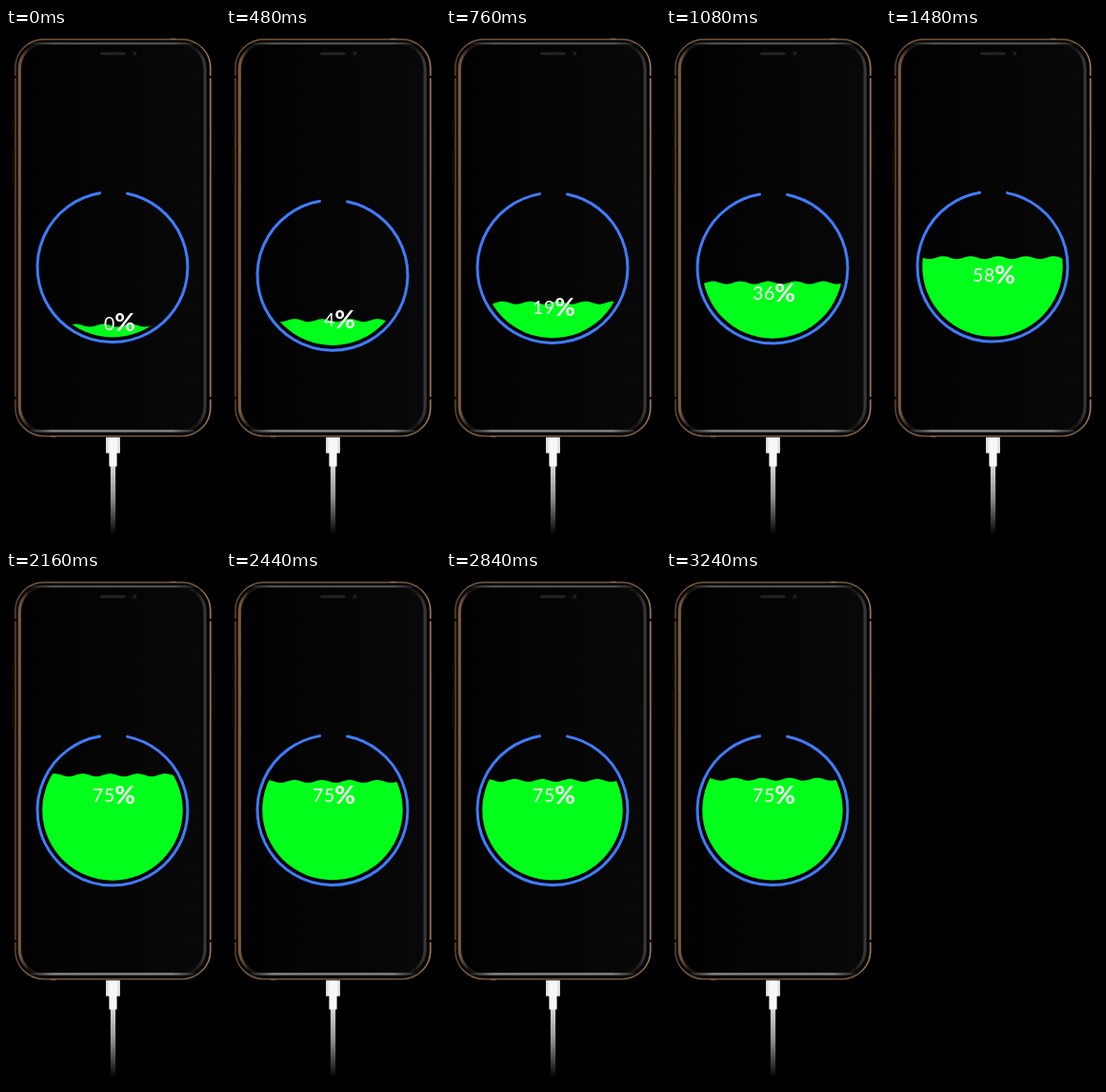
An HTML page that plays this animation: 225x542 px, repeating every 3.28 s.

```html
<!DOCTYPE html>
<html lang="en">
<head>
<meta charset="utf-8">
<title>Charging</title>
<style>
html, body { margin: 0; width: 100%; height: 100%; overflow: hidden; background: #000; }
svg { display: block; width: 225px; height: 542px; }
text { fill: #fff; font-family: Lato, "Open Sans", sans-serif; }
</style>
</head>
<body>
<svg viewBox="0 0 225 542">
  <defs>
    <linearGradient id="gold">
      <stop offset="0" stop-color="#5e4430"/>
      <stop offset=".06" stop-color="#75583f"/>
      <stop offset=".94" stop-color="#75583f"/>
      <stop offset="1" stop-color="#a88263"/>
    </linearGradient>
    <linearGradient id="side">
      <stop offset="0" stop-color="#7c5a40"/>
      <stop offset=".05" stop-color="#1a1512"/>
      <stop offset=".2" stop-color="#0c0c0c"/>
      <stop offset=".8" stop-color="#0c0c0c"/>
      <stop offset=".95" stop-color="#161616"/>
      <stop offset="1" stop-color="#383838"/>
    </linearGradient>
    <linearGradient id="edge">
      <stop offset="0" stop-color="#808080" stop-opacity="0"/>
      <stop offset=".15" stop-color="#808080"/>
      <stop offset=".85" stop-color="#808080"/>
      <stop offset="1" stop-color="#808080" stop-opacity="0"/>
    </linearGradient>
    <linearGradient id="glass">
      <stop offset="0" stop-color="#010101"/>
      <stop offset="1" stop-color="#080808"/>
    </linearGradient>
    <linearGradient id="plug">
      <stop offset="0" stop-color="#d4d4d4"/>
      <stop offset=".3" stop-color="#f8f8f8"/>
      <stop offset=".75" stop-color="#f8f8f8"/>
      <stop offset="1" stop-color="#d0d0d0"/>
    </linearGradient>
    <linearGradient id="cord" x2="0" y2="1">
      <stop offset="0" stop-color="#d6d6d6"/>
      <stop offset=".45" stop-color="#929292"/>
      <stop offset="1" stop-color="#000"/>
    </linearGradient>
    <clipPath id="bowl"><circle cx="112" cy="251.6" r="73.8"/></clipPath>
  </defs>

  <g fill="none">
    <path d="M7.5 95V113M7.5 126V166M217 106V155" stroke="#1a130e"/>
    <rect x="9.8" y="12" width="205.2" height="417.4" rx="30" fill="#040302" stroke="url(#gold)" stroke-width="1.5"/>
    <rect x="14.3" y="16" width="194.9" height="409" rx="27" fill="url(#glass)" stroke="url(#side)" stroke-width="3.2"/>
    <rect x="11.6" y="42" width="1" height="357" fill="#2d2018"/>
    <rect x="22" y="15.3" width="180" height="2" fill="url(#edge)" opacity=".65"/>
    <rect x="22" y="422.8" width="180" height="2.6" fill="url(#edge)"/>
    <path d="M9 51.5H12M213 51.5H216M9 389.5H12M213 389.5H216" stroke="#080605" stroke-width="2.5"/>
    <path d="M173 11.3H179M47 430H53" stroke="#8a6a50"/>
    <path d="M100.5 27H124" stroke="#242424" stroke-width="3" stroke-linecap="round"/>
    <circle cx="135" cy="27" r="2.7" fill="#111319"/>
    <circle cx="136" cy="26.7" r=".9" fill="#303548"/>
  </g>
  <rect x="109.9" y="461" width="5.2" height="72" fill="url(#cord)"/>
  <path d="M105 430.7H120V447.5H116.6V461.5H108.4V447.5H105Z" fill="url(#plug)"/>

  <g id="dial">
    <path id="ring" fill="none" stroke="#407cff" stroke-width="3" stroke-linecap="round"/>
    <g clip-path="url(#bowl)"><path id="liquid" fill="#02ff1c"/></g>
  </g>
  <g id="label">
    <text id="count" x="114.8" y="7.8" font-size="19.5" letter-spacing=".6" text-anchor="end"></text>
    <text x="114.2" y="9.4" font-size="26.5" font-weight="700">%</text>
  </g>
</svg>
<script>
const LOOP = 3280, CX = 112, CY = 251.6, R = 79;
const get = id => document.getElementById(id);
const [dial, ring, liquid, label, count] = ["dial", "ring", "liquid", "label", "count"].map(get);

// Piecewise linear steps: [time, value]
const DROP = [[0, 0], [560, 10], [780, 0]];
const LEVEL = [[400, 313], [2000, 207.4], [2260, 219.3]];
const LABEL = [[400, 310], [2000, 235.5]];
const PERCENT = [[400, 0], [1800, 75]];
const DRIFT = [[0, 15.5], [1080, 78], [1480, 118], [3280, 249]];

function at(steps, t) {
  if (t <= steps[0][0]) return steps[0][1];
  for (let i = 1; i < steps.length; i++) {
    const [a, from] = steps[i - 1], [b, to] = steps[i];
    if (t < b) return from + (to - from) * (t - a) / (b - a);
  }
  return steps[steps.length - 1][1];
}

// Damped swing, two cycles a second
function swing(t, start, size) {
  const s = (t - start) / 1000;
  return s > 0 ? size * Math.sin(4 * Math.PI * s) * Math.exp(-2 * s) : 0;
}

function rim(deg) {
  const a = deg * Math.PI / 180;
  return `${CX + R * Math.sin(a)} ${CY - R * Math.cos(a)}`;
}
ring.setAttribute("d", `M${rim(11.4)}A${R} ${R} 0 1 1 ${rim(-9.8)}`);

function draw(t) {
  const dip = at(DROP, t) + swing(t, 780, -3.9);
  const top = at(LEVEL, t) + swing(t, 2260, 3.9) - dip;
  const drift = at(DRIFT, t);
  let d = "M36 330";
  for (let x = 36; x <= 188; x += 2) {
    const y = top - 1.5 * Math.cos(2 * Math.PI * (x - drift) / 29);
    d += `L${x} ${y.toFixed(2)}`;
  }
  liquid.setAttribute("d", d + "V330Z");
  dial.setAttribute("transform", `translate(0 ${dip})`);
  label.setAttribute("transform", `translate(0 ${at(LABEL, t)})`);
  count.textContent = Math.round(at(PERCENT, t));
}

const start = performance.now();
function tick() {
  draw((performance.now() - start) % LOOP);
  requestAnimationFrame(tick);
}
draw(0);
requestAnimationFrame(tick);
</script>
</body>
</html>
```
